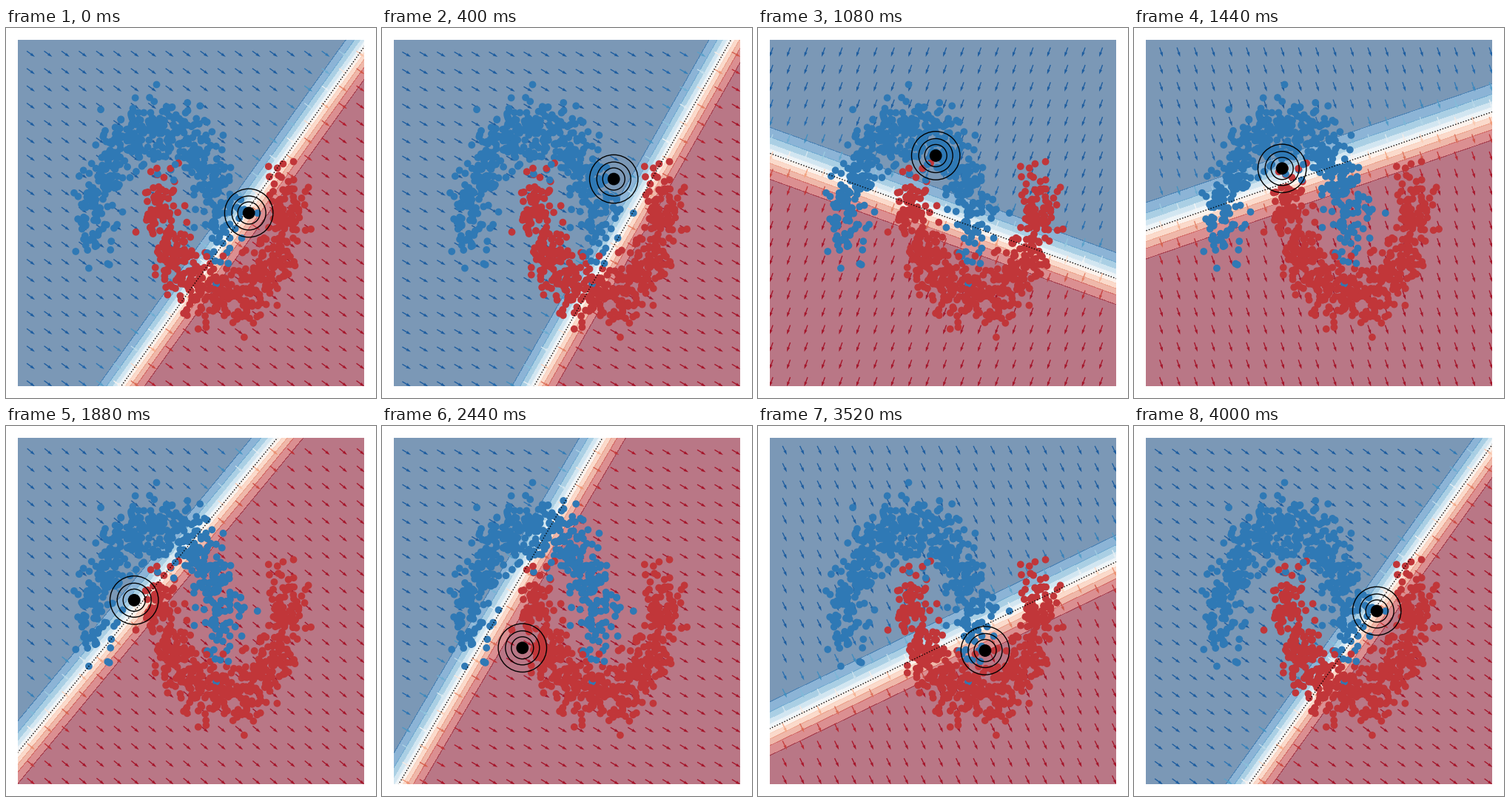
A matplotlib script that plays this animation: 500 px wide and 500 px high, repeating every 4040 ms.

```python
import numpy as np
import matplotlib.pyplot as plt
from matplotlib.animation import FuncAnimation
from matplotlib.patches import Circle

FRAMES = 101
CYCLE = 100
HALF = CYCLE // 2
INSET = 0.0311            # axes margin as a share of the figure
UNIT = 500 * (1 - 2 * INSET) / 6   # pixels per data unit

# Key poses of the local linear model: step, x weight, y weight, bias
KEYS = np.array([
    (0, 5.433, -3.890, -5.087),
    (18, 1.674, -2.908, -2.282),
    (36, 1.549, -4.512, 3.251),
    (61, 5.482, -3.226, 6.291),
    (76, -1.760, -4.800, 0.563),
    (88, 2.280, -4.732, -2.800),
])


def make_moons(n, noise, seed):
    """Two shuffled, noisy half circles, standardised."""
    rng = np.random.RandomState(seed)
    t = np.linspace(0, np.pi, n // 2)
    upper = np.c_[np.cos(t), np.sin(t)]
    xy = np.r_[upper, (1, 0.5) - upper]
    label = np.repeat([0, 1], n // 2)
    order = np.arange(n)
    rng.shuffle(order)
    xy = xy[order] + rng.normal(scale=noise, size=xy.shape)
    return (xy - xy.mean(axis=0)) / xy.std(axis=0), label[order]


def make_track():
    """Periodic knots; the moons swap under a half turn, which flips the bias."""
    rows = list(KEYS)
    for step, wx, wy, bias in KEYS:
        twin = (step + HALF) % CYCLE
        if np.abs(KEYS[:, 0] - twin).min() > 5:
            rows.append((twin, wx, wy, -bias))
    rows = np.array(sorted(map(tuple, rows)))
    knots = np.concatenate([rows[:, 0] + k * CYCLE for k in (-1, 0, 1)])
    values = np.tile(rows[:, 1:], (3, 1))
    return knots, values, np.gradient(values, knots, axis=0)


knots, values, slopes = make_track()


def fit_at(step):
    """Cubic Hermite interpolation of the model coefficients."""
    k = np.searchsorted(knots, step, side="right") - 1
    h = knots[k + 1] - knots[k]
    s = (step - knots[k]) / h
    wx, wy, bias = ((1 + 2 * s) * (1 - s) ** 2 * values[k]
                    + s * (1 - s) ** 2 * h * slopes[k]
                    + s * s * (3 - 2 * s) * values[k + 1]
                    + s * s * (s - 1) * h * slopes[k + 1])
    return np.array([wx, wy]), bias


def prob(x, y, w, bias):
    return 1 / (1 + np.exp(-(w[0] * x + w[1] * y + bias)))


def grid(n):
    side = np.linspace(-3, 3, n)
    return np.meshgrid(side, side)


fig = plt.figure(figsize=(5, 5), dpi=100, facecolor="white")
ax = fig.add_axes([INSET, INSET, 1 - 2 * INSET, 1 - 2 * INSET])
ax.set(xlim=(-3, 3), ylim=(-3, 3))
ax.axis("off")

gx, gy = grid(240)
qx, qy = grid(21)
ones = np.ones_like(qx)
levels = np.linspace(0, 1, 11)

arrows = ax.quiver(qx, qy, ones, ones, ones, pivot="tip", scale=35,
                   scale_units="width", cmap="RdBu_r", clim=(-0.1, 1.1), zorder=2)
samples, labels = make_moons(1000, noise=0.15, seed=0)
ax.scatter(*samples.T, c=labels, cmap="RdBu_r", vmin=-0.2, vmax=1.2,
           s=36, linewidths=1, zorder=3)
border, = ax.plot([], [], "k:", lw=1, zorder=4)
rings = [Circle((1, 0), r / UNIT, fill=r < 10, fc="black", ec="black", lw=1, zorder=5)
         for r in (7.7, 15, 23, 32.7)]
for ring in rings:
    ax.add_patch(ring)

bands = None


def draw(i):
    global bands
    w, bias = fit_at(i % CYCLE)
    norm = np.hypot(*w)
    n = w / norm

    if bands is not None:
        bands.remove()
    bands = ax.contourf(gx, gy, prob(gx, gy, w, bias), levels=levels, cmap="RdBu_r",
                        vmin=0.015, vmax=0.985, alpha=0.55, zorder=1)

    arrows.set_UVC(ones * n[0], ones * n[1], prob(qx, qy, w, bias))

    foot = -bias / norm * n
    along = np.array([-n[1], n[0]]) * 5
    border.set_data(*np.c_[foot - along, foot + along])

    a = 2 * np.pi * i / CYCLE
    for ring in rings:
        ring.center = np.cos(a), np.sin(a)
    return []


anim = FuncAnimation(fig, draw, frames=FRAMES, interval=40, init_func=lambda: [],
                     repeat=True, repeat_delay=0)
plt.show()
```
